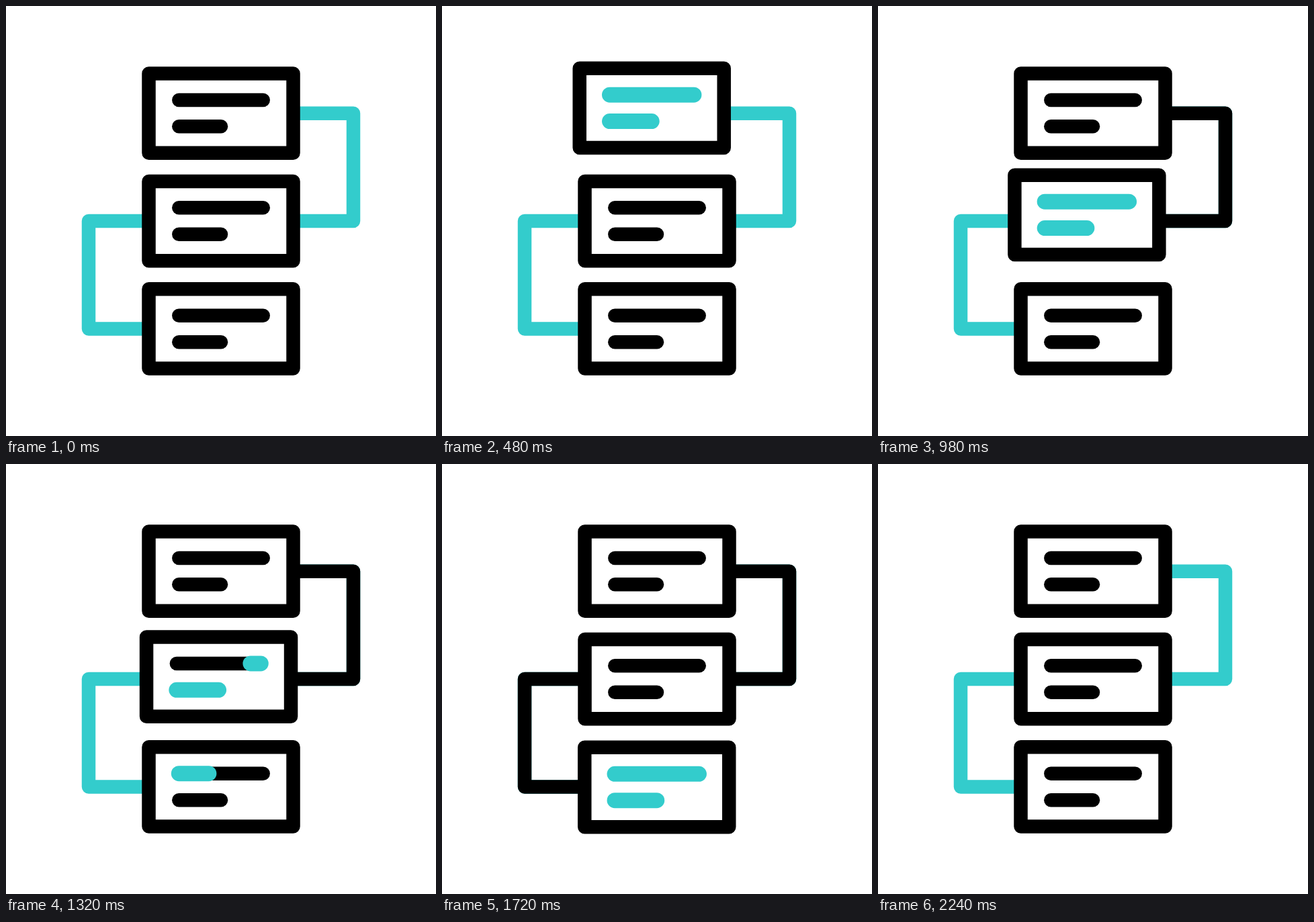
An HTML page with a canvas for the animation above (2400 ms loop, 640 by 640 pixels).

```html
<!DOCTYPE html>
<html lang="en">
<head>
<meta charset="utf-8">
<title>Linked cards</title>
<style>
  html, body { margin: 0; width: 100%; height: 100%; overflow: hidden; background: #fff; }
  canvas { display: block; }
</style>
</head>
<body>
<canvas id="stage" width="640" height="640"></canvas>
<script>
const ctx = document.getElementById('stage').getContext('2d');
const LOOP = 2400, TEAL = '#33cccc', BLACK = '#000', WEIGHT = 20.5;
const CENTER = 320, TOP = 100.5, PITCH = 160.4, CARD_W = 215, CARD_H = 118.3;
const LINE_GAP = CARD_H / 3, LINE_LEFT = 257.3;
const LINE_TIME = 180, LINE_HOLD = 581, SEGMENT_TIME = 170, ERASE_START = 1885;
ctx.lineCap = ctx.lineJoin = 'round';

const ramp = (t, start, duration) => Math.min(1, Math.max(0, (t - start) / duration));

// Strokes the part of a polyline between the fractions from and to
function trim(points, color, from = 0, to = 1, weight = WEIGHT) {
  if (to - from < 0.001) return;
  let length = 0;
  ctx.beginPath();
  points.forEach(([x, y], i) => {
    ctx.lineTo(x, y);
    if (i) length += Math.hypot(x - points[i - 1][0], y - points[i - 1][1]);
  });
  ctx.setLineDash([(to - from) * length, length * 2]);
  ctx.lineDashOffset = -from * length;
  ctx.strokeStyle = color;
  ctx.lineWidth = weight;
  ctx.stroke();
  ctx.setLineDash([]);
}

// Joins card i to the next one, on alternating sides
function drawLink(i, t) {
  const side = i % 2 ? -1 : 1;
  const near = CENTER + 105 * side, far = CENTER + 197 * side;
  const top = TOP + CARD_H / 2 + i * PITCH, bottom = top + PITCH;
  const path = [[near, top], [far, top], [far, bottom], [near, bottom]];
  trim(path, TEAL);
  trim(path, BLACK,
    ramp(t, ERASE_START + i * SEGMENT_TIME, SEGMENT_TIME),
    ramp(t, 640 + i * 680, 200));
}

// Leans up and left while the lines fill, then drifts back
const lean = (t, start) => -9.8 * (ramp(t, start, 360) - ramp(t, start + 360, 585));

// Dips back a little, then is pushed forward by the given distance and settles
const bump = (t, push) =>
  -3 * ramp(t, 1320, 300) + (3 + push) * ramp(t, 1620, 220) - push * ramp(t, 1840, 390);

function drawCard(start, i, t) {
  const last = i === 2;
  const dx = last ? bump(t, 3) : lean(t, start);
  const dy = last ? bump(t, 4.8) : dx;
  const left = CENTER - CARD_W / 2;
  ctx.save();
  ctx.translate(dx, TOP + i * PITCH + dy);
  ctx.fillStyle = '#fff';
  ctx.strokeStyle = BLACK;
  ctx.lineWidth = WEIGHT;
  ctx.fillRect(left, 0, CARD_W, CARD_H);
  ctx.strokeRect(left, 0, CARD_W, CARD_H);
  for (let row = 0; row < 2; row++) {
    const y = LINE_GAP * (row + 1), on = start + row * LINE_TIME;
    const line = [[LINE_LEFT, y], [LINE_LEFT + 125.4 / (row + 1), y]];
    trim(line, BLACK);
    trim(line, TEAL, ramp(t, on + LINE_HOLD, LINE_TIME), ramp(t, on, LINE_TIME), 23);
  }
  ctx.restore();
}

// Three rays fan out beside the last card: side is -1, 0 or 1
function drawSpark(side, t) {
  const bend = side * side, angle = (48 * side + 8 * bend) * Math.PI / 180;
  const x = 508.5 - 15.5 * bend, y = 494.5 + 32.2 * side, length = 95 - 22 * bend;
  const tip = [x + length * Math.cos(angle), y + length * Math.sin(angle)];
  trim([[x, y], tip], TEAL,
    ramp(t, ERASE_START + SEGMENT_TIME, SEGMENT_TIME),
    ramp(t, ERASE_START - 5, SEGMENT_TIME));
}

function render(time) {
  const t = time % LOOP;
  ctx.fillStyle = '#fff';
  ctx.fillRect(0, 0, 640, 640);
  [0, 1].forEach(i => drawLink(i, t));
  [0, 581, 1256].forEach((start, i) => drawCard(start, i, t));
  [-1, 0, 1].forEach(side => drawSpark(side, t));
}

let origin;
function tick(now) {
  origin ??= now;
  render(now - origin);
  requestAnimationFrame(tick);
}
render(0);
requestAnimationFrame(tick);
</script>
</body>
</html>
```
